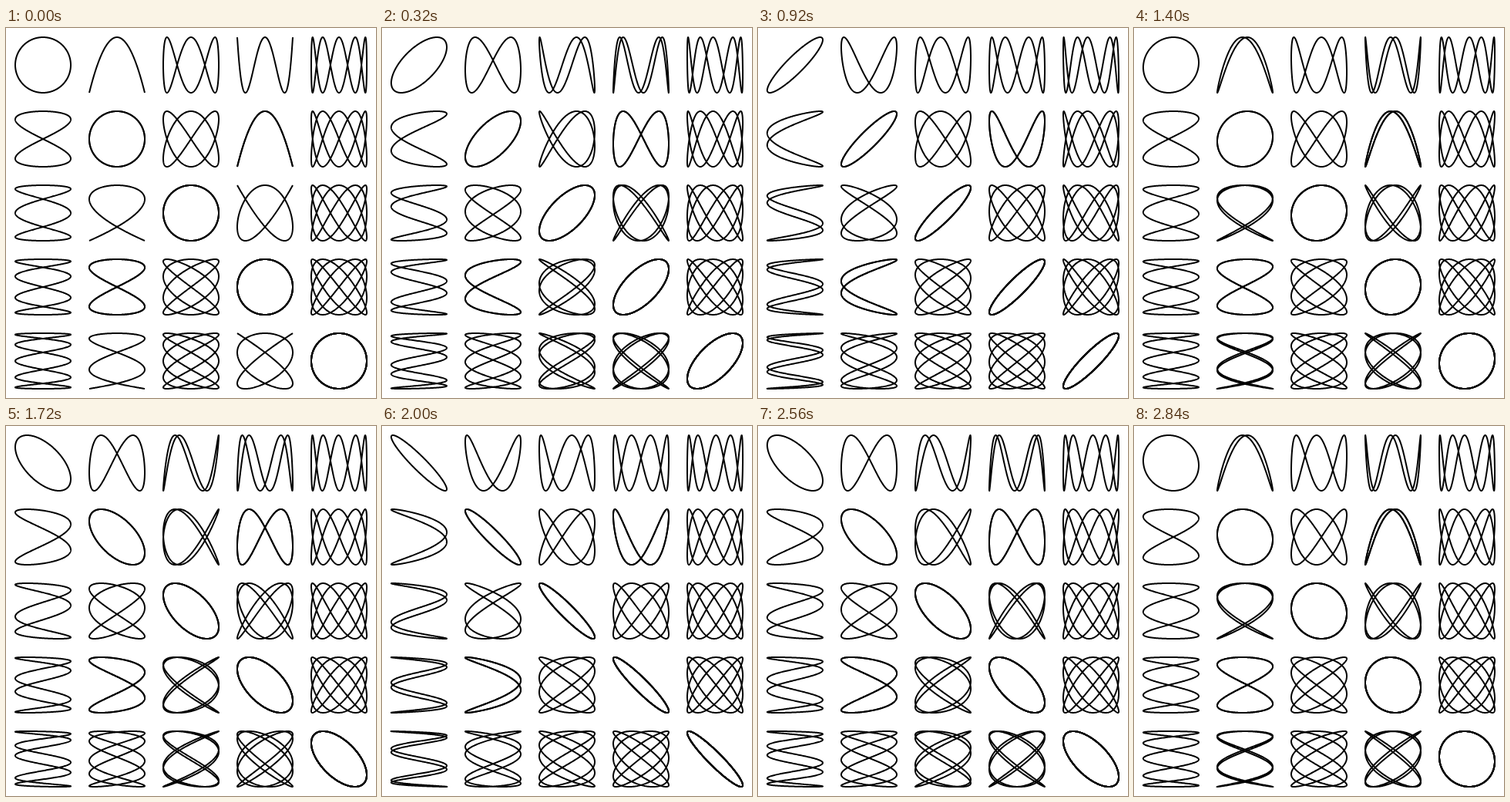
Recreate the animation shown at these times as an HTML page with a canvas. Size 480 by 480 pixels, loop 2.88 s.

```html
<!DOCTYPE html>
<html lang="en">
<head>
<meta charset="utf-8">
<title>Lissajous table</title>
<style>
  html, body { margin: 0; width: 100%; height: 100%; overflow: hidden; background: #fff; }
  canvas { display: block; }
</style>
</head>
<body>
<canvas id="stage" width="480" height="480"></canvas>
<script>
const ctx = document.getElementById("stage").getContext("2d");
const TAU = 2 * Math.PI;
const SIZE = 5, CELL = 96, RADIUS = 36;
const STEP_MS = 40, STEPS = 72;
const POINTS = 720;

const gcd = (a, b) => b ? gcd(b, a % b) : a;

function drawCurve(cx, cy, fx, fy, phase) {
  const rounds = gcd(fx, fy);
  ctx.beginPath();
  for (let i = 0; i < POINTS; i++) {
    const t = TAU * i / POINTS / rounds;
    ctx.lineTo(cx + RADIUS * Math.sin(fx * t + phase), cy - RADIUS * Math.cos(fy * t));
  }
  ctx.closePath();
  // A curve with a common factor is traced several times, which firms up its edges.
  for (let i = 0; i < rounds; i++) ctx.stroke();
}

function draw(now) {
  const step = Math.floor(now / STEP_MS) % STEPS;
  const phase = TAU * step / STEPS;
  ctx.fillStyle = "#fff";
  ctx.fillRect(0, 0, 480, 480);
  ctx.strokeStyle = "#000";
  ctx.lineWidth = 2;
  for (let row = 0; row < SIZE; row++) {
    for (let col = 0; col < SIZE; col++) {
      drawCurve((col + 0.5) * CELL, (row + 0.5) * CELL, row + 1, col + 1, phase);
    }
  }
}

const start = performance.now();
function tick() {
  draw(performance.now() - start);
  requestAnimationFrame(tick);
}
tick();
</script>
</body>
</html>
```
